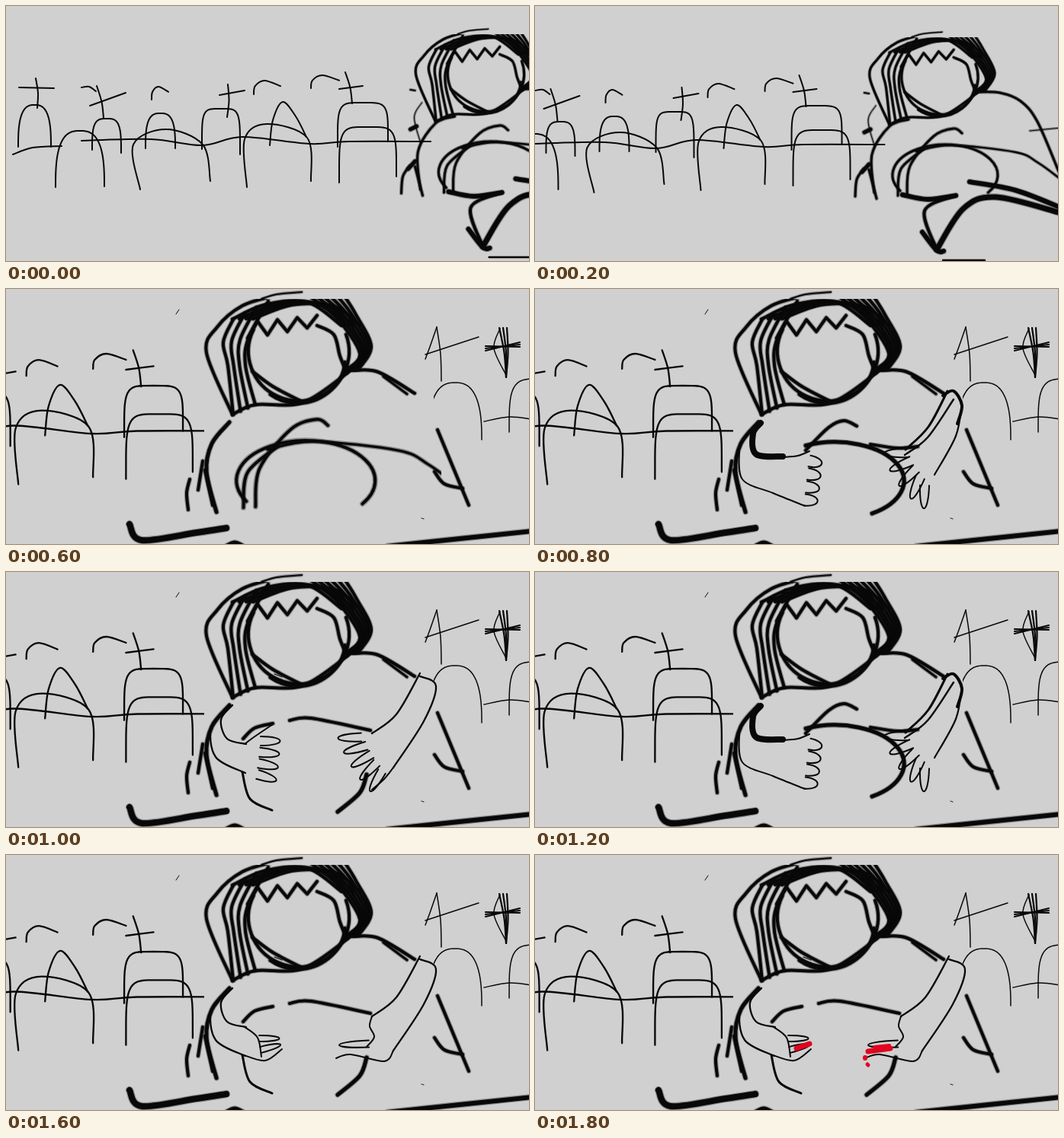
An HTML page with a canvas that plays this animation: 686 by 335 pixels, repeating every 2000 ms.

```html
<!DOCTYPE html>
<html>
<head>
<meta charset="utf-8">
<style>
html, body { margin: 0; width: 100%; height: 100%; overflow: hidden; background: #d0d0d0; }
canvas { display: block; }
</style>
</head>
<body>
<canvas id="stage" width="686" height="335"></canvas>
<script>
const ctx = document.getElementById('stage').getContext('2d');
const PAPER = '#d0d0d0', INK = '#080808', RED = '#e00520';

// Camera views: scale and offset relative to the opening shot.
const WIDE = { s: 1, x: 0, y: 0 };
const PAN = { s: 1, x: -98.5, y: 4 };
const NEAR = { s: 1.167, x: -352.6, y: -21.2 };
const CLOSE = { s: 1.319, x: -446.3, y: -35.8 };

let soft = false;
const mix = (a, b, t) => a + (b - a) * t;
const wobble = i => 3 * Math.sin(i * 12.9 + 1);

function look(from, to) {
  const s = to.s / from.s;
  ctx.setTransform(s, 0, 0, s, to.x - from.x * s, to.y - from.y * s);
}

// Soft strokes get a pale rim around a thinner core.
function ink(width) {
  if (soft) {
    ctx.globalAlpha = 0.35;
    ctx.lineWidth = width + 1.3;
    ctx.stroke();
    ctx.globalAlpha = 1;
  }
  ctx.lineWidth = soft ? width - 1 : width;
  ctx.stroke();
}

function curve(width, ...p) {
  const last = p.length / 2 - 1;
  const at = i => { const k = 2 * Math.max(0, Math.min(last, i)); return [p[k], p[k + 1]]; };
  ctx.beginPath();
  ctx.moveTo(p[0], p[1]);
  for (let i = 0; i < last; i++) {
    const [a, b, c, d] = [at(i - 1), at(i), at(i + 1), at(i + 2)];
    ctx.bezierCurveTo(b[0] + (c[0] - a[0]) / 6, b[1] + (c[1] - a[1]) / 6,
      c[0] - (d[0] - b[0]) / 6, c[1] - (d[1] - b[1]) / 6, c[0], c[1]);
  }
  ink(width);
}

function oval(width, x, y, rx, ry, from, to) {
  ctx.beginPath();
  ctx.ellipse(x, y, rx, ry, 0, from, to);
  ink(width);
}

// Half superellipse: a higher power gives squarer shoulders.
function arch(width, left, right, top, leftFoot, rightFoot, power = 2.8) {
  ctx.beginPath();
  for (let i = 0; i <= 48; i++) {
    const a = Math.PI * (1 - i / 48), c = Math.cos(a);
    const foot = c < 0 ? leftFoot : rightFoot;
    const x = (left + right + (right - left) * Math.sign(c) * Math.abs(c) ** (2 / power)) / 2;
    ctx.lineTo(x, mix(foot, top, Math.abs(Math.sin(a)) ** (2 / power)));
  }
  ink(width);
}

function cross(width, x1, y1, x2, y2, armX1, armY1, armX2, armY2) {
  curve(width, x1, y1, (x1 + x2) / 2 + 2, (y1 + y2) / 2, x2, y2);
  curve(width, armX1, armY1, armX2, armY2);
}

const cap = (x, y, w, h) => curve(2, x, y + h, x + w * 0.05, y + h * 0.4, x + w * 0.4, y, x + w, y + h * 0.4);

function finger(x, y, angle, length, width) {
  const c = Math.cos(angle), s = Math.sin(angle), reach = length / 0.75, half = width / 2;
  ctx.beginPath();
  ctx.moveTo(x - s * half, y + c * half);
  ctx.bezierCurveTo(x + c * reach - s * half, y + s * reach + c * half,
    x + c * reach + s * half, y + s * reach - c * half, x + s * half, y - c * half);
  ink(2);
}

// Fingers spread evenly along the knuckles.
function fingers(count, x1, y1, x2, y2, angle1, angle2, length, width) {
  for (let i = 0; i < count; i++) {
    const t = i / (count - 1);
    finger(mix(x1, x2, t), mix(y1, y2, t), mix(angle1, angle2, t), length + wobble(i), width);
  }
}

function clipped(x, y, w, h, paint) {
  ctx.save();
  ctx.beginPath();
  ctx.rect(x, y, w, h);
  ctx.clip();
  paint();
  ctx.restore();
}

function leftGraves(view) {
  look(WIDE, view);
  const w = 2;
  curve(w, 9, 195, 35, 186, 73, 184);
  curve(w, 99, 177, 190, 175, 258, 183, 310, 172, 398, 181, 450, 178, 557, 178);
  arch(w, 16, 59, 130, 185, 185);
  arch(w, 113, 151, 148, 189, 193, 3.5);
  arch(w, 183, 222, 141, 187, 187, 3);
  arch(w, 257, 307, 135, 188, 195, 5);
  curve(w, 346, 183, 350, 150, 363, 126, 380, 145, 394, 172);
  arch(w, 435, 501, 127, 185, 178, 5);
  arch(w, 65, 129, 164, 238, 237);
  curve(w, 176, 241, 167, 182, 210, 162, 258, 182, 268, 230);
  curve(w, 316, 238, 313, 175, 342, 155, 395, 173, 400, 230);
  arch(w, 437, 512, 159, 232, 224, 5);
  cross(w, 39, 95, 41, 134, 17, 107, 63, 108);
  cross(w, 119, 105, 128, 147, 110, 131, 157, 114);
  cross(w, 291, 103, 290, 146, 280, 117, 313, 111);
  cross(w, 445, 87, 454, 128, 437, 109, 468, 105);
  curve(w, 99, 107, 109, 106, 118, 112);
  cap(191, 106, 22, 17);
  cap(325, 98, 35, 18);
  cap(400, 91, 37, 17);
}

function rightGraves() {
  look(WIDE, WIDE);
  cross(1.5, 565, 50, 571, 121, 550, 86, 620, 63);
  curve(1.5, 565, 50, 556, 76, 550, 92);
  arch(1.5, 554, 624, 123, 197, 198, 2.6);
  arch(1.5, 660, 740, 118, 188, 188, 4);
  curve(1.5, 627, 174, 660, 168, 690, 171);
  for (let i = 0; i < 3; i++) cross(2.2, 647 + 5 * i, 51, 656, 116, 629, 81 - 3 * i, 674, 70 + 3 * i);
  curve(1.5, 648, 52, 640, 78, 656, 113);
}

function face() {
  oval(5, 384, 82, 66, 65, -0.35, Math.PI + 0.45);
  oval(5, 383, 90, 62, 60, 0.1, 2.2);
  curve(5, 323, 108, 350, 128, 386, 147);
  curve(5, 297, 165, 327, 152, 390, 149, 452, 107);
  ctx.beginPath();
  for (let i = 0; i < 8; i++) ctx.lineTo(317 + 13 * i, (i % 2 ? 42 - i : 63 - 2 * i) + wobble(i) / 2);
  ink(5);
  curve(5, 408, 48, 430, 60, 438, 88, 447, 110);
}

function hair() {
  curve(5, 352, 9, 310, 22, 277, 50, 263, 84, 297, 165);
  for (let i = 0; i < 4; i++) {
    const t = i / 3, j = wobble(i);
    curve(5, mix(344, 298, t), mix(16, 40, t), mix(318, 285, t), 62 + 5 * t + j,
      mix(314, 291, t), 95 + 2 * j, mix(327, 298, t), mix(152, 165, t));
    curve(5, 297 + 9 * i, 42 - j, 340 + 12 * i, 18 + j, 395 + 12 * i, 17 + 2 * i, 440 + 8 * i, 48);
  }
  for (let i = 0; i < 6; i++) {
    const j = wobble(i + 4);
    curve(5, 400 + 9 * i, 11, 434 + 5 * i, 36 + j, 464 + 3 * i, 80 + 2 * j, 447 + 3 * i, 106);
  }
}

function head(view) {
  look(CLOSE, view);
  curve(3, 335, 13, 355, 7, 388, 4);
  clipped(200, 13, 340, 180, () => { face(); hair(); });
}

function belly() {
  oval(4, 538, 222, 69, 40, 2.6, 6.9);
  curve(4, 476, 249, 480, 214, 510, 188);
}

function innerArm() {
  curve(4, 560, 167, 549, 161, 523, 171, 492, 210, 488, 248);
}

function lowerArm() {
  curve(3.5, 500, 191, 545, 183, 630, 192, 660, 206, 690, 228);
}

function torso(view) {
  look(PAN, view);
  curve(4, 580, 113, 610, 114, 637, 125, 659, 152, 688, 220);
  curve(2, 649, 164, 690, 160);
  lowerArm();
  belly();
  innerArm();
  curve(7, 482, 248, 515, 254, 552, 249);
  curve(5, 552, 249, 511, 269, 527, 320);
  curve(7, 508, 297, 527, 321, 536, 322);
  curve(8, 527, 320, 562, 266, 605, 251, 690, 272);
  curve(7, 570, 231, 630, 242, 690, 265);
  curve(4, 490, 149, 465, 158, 442, 195, 445, 245);
  curve(2, 447, 131, 437, 150, 445, 183);
  curve(6, 432, 166, 440, 162);
  curve(6, 429, 218, 438, 208);
  curve(4, 420, 250, 422, 228, 431, 214);
  curve(4, 438, 215, 448, 253);
  curve(3, 432, 114, 438, 115);
  curve(1, 535, 334, 590, 334);
}

function scribble(x1, y1, x2, y2) {
  for (let i = 0; i < 3; i++) {
    curve(1.5, x1 + 3 * i, y1 + 2 * i, mix(x1, x2, 0.5) + 6 * (i - 1), mix(y1, y2, 0.5), x2 - 2 * i, y2 - 3 * i);
  }
}

function closeBody() {
  look(WIDE, WIDE);
  curve(6, 293, 175, 270, 203, 263, 240, 276, 293);
  curve(5, 241, 250, 237, 268, 239, 290);
  curve(5, 258, 226, 252, 264);
  curve(5, 261, 238, 271, 284);
  curve(5, 455, 107, 488, 109, 536, 137);
  curve(4, 495, 115, 526, 138);
  curve(5, 566, 185, 607, 284);
  curve(5, 562, 240, 575, 256, 599, 262);
  curve(9, 162, 309, 178, 330, 250, 320, 289, 314);
  curve(8, 290, 338, 300, 334, 310, 338);
  curve(7, 500, 338, 690, 318);
  soft = false;
  curve(1, 227, 27, 223, 33);
  curve(1, 545, 301, 548, 302);
}

function bareBelly() {
  soft = true;
  clipped(266, 132, 305, 175, () => {
    look(PAN, CLOSE);
    lowerArm();
    belly();
    innerArm();
  });
  soft = false;
}

function openHands() {
  soft = true;
  oval(6, 393, 252, 91, 51, -2, 1);
  curve(5, 355, 212, 385, 182, 405, 173, 422, 180);
  curve(5, 440, 204, 475, 209, 502, 207);
  soft = false;
  curve(8, 296, 176, 286, 190, 290, 217, 325, 220);
  curve(2, 268, 210, 272, 250, 312, 268, 354, 285);
  curve(2, 325, 221, 345, 219, 360, 213);
  fingers(4, 360, 226, 354, 277, 0.2, 0.1, 14, 15);
  curve(3, 541, 134, 516, 181, 486, 211);
  curve(2.5, 549, 145, 515, 195, 485, 218);
  curve(4, 535, 140, 549, 134, 560, 153, 554, 177);
  curve(2.2, 560, 150, 552, 193, 524, 244);
  fingers(5, 488, 215, 511, 258, 3.1, 1.6, 28, 12);
}

function arms() {
  curve(2.3, 297, 175, 270, 201, 275, 243, 314, 264);
  curve(2.3, 297, 175, 282, 194, 290, 219, 315, 226);
  soft = true;
  curve(5, 311, 219, 326, 205, 350, 199);
  curve(5, 372, 195, 400, 192, 478, 208);
  curve(6, 473, 266, 464, 290, 435, 315);
  soft = false;
  curve(3, 310, 263, 320, 298, 349, 313);
  curve(2.3, 543, 133, 512, 187, 480, 212);
  curve(2.3, 543, 137, 564, 150, 548, 196, 508, 257);
  curve(1.3, 352, 134, 362, 138);
}

function spreadHands() {
  curve(2, 313, 226, 325, 217, 350, 200);
  fingers(4, 334, 222, 330, 266, 0, 0.3, 23, 12);
  fingers(5, 466, 217, 493, 262, 3.1, 2.1, 28, 11);
  curve(2, 480, 286, 496, 272, 508, 257);
}

function clenchedHands() {
  curve(2, 313, 226, 330, 240, 335, 265);
  curve(2, 312, 263, 340, 270, 362, 255);
  fingers(2, 332, 241, 334, 256, 0, -0.25, 24, 8);
  curve(2, 480, 212, 477, 225, 483, 239, 473, 252);
  finger(476, 248, 3.1, 39, 9);
  curve(2, 433, 267, 452, 262, 496, 271, 508, 257);
}

function blood() {
  ctx.strokeStyle = RED;
  curve(7, 343, 254, 360, 248);
  curve(7, 437, 258, 466, 254);
  curve(4, 445, 252, 465, 250);
  curve(6, 433, 266, 433, 267);
  curve(5, 436, 275, 437, 276);
  ctx.strokeStyle = INK;
}

const poses = {
  bare: bareBelly,
  open: openHands,
  spread() { arms(); spreadHands(); },
  clenched() { arms(); clenchedHands(); },
  bleeding() { arms(); clenchedHands(); blood(); }
};
const shots = [WIDE, PAN, NEAR, 'bare', 'open', 'spread', 'open', 'spread', 'clenched', 'bleeding'];

function wideShot(view) {
  leftGraves(view);
  look(WIDE, WIDE);
  soft = true;
  clipped(0, 0, view === NEAR ? 562 : 686, 335, () => { head(view); torso(view); });
  soft = false;
  if (view === NEAR) {
    rightGraves();
    scribble(289, 256, 314, 322);
    scribble(562, 236, 626, 312);
  }
}

function closeShot(pose) {
  look(WIDE, WIDE);
  clipped(0, 0, 260, 335, () => leftGraves(NEAR));
  rightGraves();
  ctx.fillRect(540, 140, 21, 62);
  soft = true;
  head(CLOSE);
  closeBody();
  poses[pose]();
}

function draw() {
  const shot = shots[Math.floor(performance.now() % 2000 / 200)];
  look(WIDE, WIDE);
  ctx.fillStyle = PAPER;
  ctx.fillRect(0, 0, 686, 335);
  ctx.strokeStyle = INK;
  ctx.lineCap = ctx.lineJoin = 'round';
  if (typeof shot === 'string') closeShot(shot);
  else wideShot(shot);
  requestAnimationFrame(draw);
}
draw();
</script>
</body>
</html>
```
